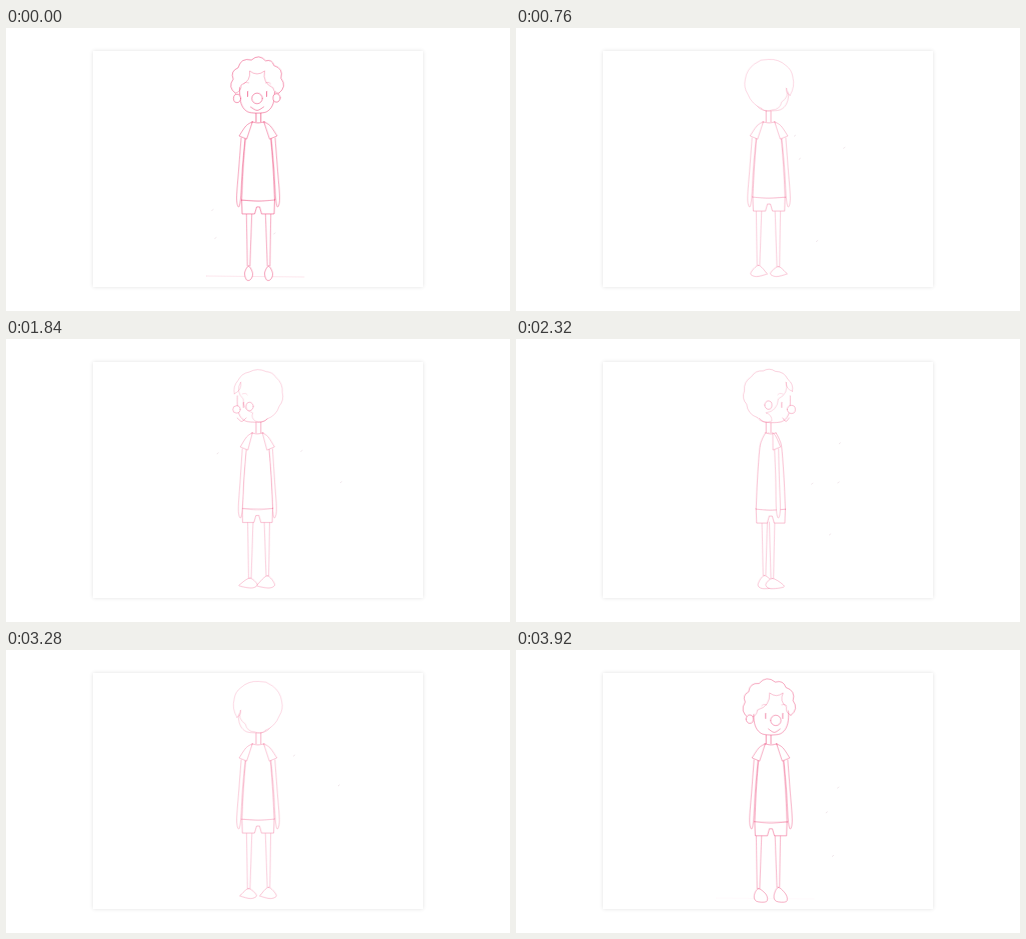
An HTML page with a canvas for the animation above (4040 ms loop, 504 by 283 pixels).

```html
<!DOCTYPE html>
<html lang="en">
<head>
<meta charset="utf-8">
<title>Turnaround sketch</title>
<style>
  html, body { margin: 0; width: 100%; height: 100%; overflow: hidden; background: #fff; }
  canvas { display: block; width: 504px; height: 283px; }
</style>
</head>
<body>
<canvas id="stage"></canvas>
<script>
const W = 504, H = 283, LOOP = 4040, VIEWS = 14, DRAWINGS = 42;
const HEAD = 251, MIRROR = 505;
const { PI, sin, cos, abs, sqrt, max, sign } = Math;
const canvas = document.getElementById('stage');
const ctx = canvas.getContext('2d');
const ratio = window.devicePixelRatio || 1;
canvas.width = W * ratio;
canvas.height = H * ratio;

function seeded(seed) {
  let n = seed * 7919 + 17;
  return () => (n = (n * 16807) % 2147483647) / 2147483647;
}

function polygon(pts) {
  const path = new Path2D();
  pts.forEach(p => path.lineTo(...p));
  return path;
}

// Smooth line through the points
function curve(pts, closed) {
  const path = new Path2D(), n = pts.length;
  const at = i => closed ? pts[(i + n) % n] : pts[max(0, Math.min(n - 1, i))];
  path.moveTo(...pts[0]);
  for (let i = 0; i < (closed ? n : n - 1); i++) {
    const [p, a, b, q] = [at(i - 1), at(i), at(i + 1), at(i + 2)];
    path.bezierCurveTo(a[0] + (b[0] - p[0]) / 6, a[1] + (b[1] - p[1]) / 6,
      b[0] - (q[0] - a[0]) / 6, b[1] - (q[1] - a[1]) / 6, ...b);
  }
  return path;
}

// A row of arcs, each bulging to the left of its direction of travel
function scallops(pts, depth) {
  const path = new Path2D();
  path.moveTo(...pts[0]);
  for (let i = 1; i < pts.length; i++) {
    const [x, y] = pts[i - 1], [u, v] = pts[i];
    path.quadraticCurveTo((x + u) / 2 + (v - y) * depth, (y + v) / 2 - (u - x) * depth, u, v);
  }
  return path;
}

function oval(x, y, rx, ry) {
  const path = new Path2D();
  path.ellipse(x, y, rx, ry, 0, 0, PI * 2);
  return path;
}

let ink = 1;
const pink = a => `rgba(235,62,115,${a})`;
const blank = path => { ctx.fillStyle = '#fff'; ctx.fill(path); };

function sketch(path, weight = 1) {
  ctx.lineWidth = .8;
  ctx.strokeStyle = pink(ink * weight);
  ctx.stroke(path);
  ctx.save();
  ctx.translate(.7, -.4);
  ctx.strokeStyle = pink(ink * weight * .3);
  ctx.stroke(path);
  ctx.restore();
}
function solid(path, weight) { blank(path); sketch(path, weight); }

// c, s: facing of head and feet. b: facing of the body, which hurries through profile.
function facing(view) {
  const turn = view * 2 * PI / VIEWS;
  const c = cos(turn), s = sin(turn);
  return { c, s, b: cos(turn - .4 * sin(2 * turn)), axis: 252 - 2.5 * s * (1 + c), hem: 170.5 + 1.5 * c };
}

function drawLeg(side, { c, s, b, hem }) {
  const hip = 252.5 + side * 9.5 * b, x = 252.5 + side * 10 * b;
  const top = hem + 13, y = 238 + side * s * 1.5, toe = sqrt(abs(s));
  const edge = w => [[hip + w * 2.7, top], [(hip + x) / 2 + w * 2, (top + y) / 2], [x + w * 1.3, y]];
  blank(polygon([...edge(-1), ...edge(1).reverse()]));
  for (const w of [-1, 1]) sketch(curve(edge(w)), .8);
  solid(curve([[x, y], [x - 4 - 6 * toe, 245], [x - 2 - 9 * toe, 249 + 3 * c],
    [x + 2, 250 + 1.5 * c], [x + 6 - 2 * c, 245.5]], true), .9);
}

function drawArm(side, { b, axis }) {
  const at = l => axis + side * l * b;
  const edge = w => [[at(15) + w * 2, 110], [at(17.5) + w * 1.8, 140], [at(19.5) + w * 2, 170]];
  solid(curve([...edge(-1), [at(19.5), 179], ...edge(1).reverse()]), .85);
}

function drawSleeve(side, { b, axis }) {
  const at = l => axis + side * l * b, out = 4 * (sign(side * b) || 1);
  const sleeve = curve([[at(6), 94], [at(11) + out * .3, 98], [at(15) + out, 108]]);
  sleeve.lineTo(at(15) - out * .8, 111);
  sleeve.closePath();
  solid(sleeve, .9);
}

function drawShorts({ s, axis, hem }) {
  const w = 16.5 * (1 - .12 * s * s);
  const half = k => [[w * k, hem], [(w - .5) * k, hem + 14], [3.5 * k, hem + 14], [1.5 * k, hem + 7]];
  const path = polygon([...half(-1), ...half(1).reverse()].map(([x, y]) => [axis + x, y]));
  path.closePath();
  solid(path);
}

function drawShirt({ s, axis, hem }) {
  const slim = 1 - .12 * s * s;
  const edge = k => [[6, 94], [10, 101], [12.5, 110], [15, 140], [16.5, hem]].map(([x, y]) => [axis + x * k * slim, y]);
  const left = edge(-1), right = edge(1);
  blank(polygon([...left, ...right.slice().reverse()]));
  sketch(curve(left));
  sketch(curve(right));
  sketch(curve([left[4], [axis, hem + 1.3], right[4]]), .8);
  sketch(curve([left[0], [axis, 95], right[0]]));
}

function drawHead(view, { c, s }) {
  const place = (l, f) => HEAD + l * c - f * s;
  const toward = (l, f) => l * s + f * c;
  const seen = c > -.8, middle = HEAD - 3 * s;

  const jaw = [[middle - 17.5, 57]];
  for (let i = 0; i <= 12; i++) {
    const a = PI * (1 - i / 12);
    jaw.push([middle + 17.5 * sign(cos(a)) * abs(cos(a)) ** .65, 64 + (20 + 1.2 * c) * abs(sin(a)) ** .85]);
  }
  if (c > -.95) solid(curve(jaw), seen ? 1 : .7);

  // Curls run over the skull from one temple to the other
  const random = seeded(view + 3), base = 47 - 22 * c;
  const from = PI - (base - 45 * s * (1 - c)) * PI / 180;
  const to = 2 * PI + (base + 10 * s) * PI / 180;
  const curls = [];
  for (let i = 0; i <= 7; i++) {
    const wobble = i % 7 ? (random() - .5) * .3 : 0;
    const a = from + (to - from) * (i + wobble) / 7;
    curls.push([HEAD + 1.5 * s + 24 * cos(a), 53 + (sin(a) < 0 ? 21.5 : 29) * sin(a)]);
  }
  const fringe = [curls[0]];
  for (const [l, f, y] of [[-16, 5, 57], [-7.5, 15, 43], [7.5, 15, 43], [16, 5, 60]]) {
    if (toward(l, f) > -4.5) fringe.push([place(l, f), y]);
  }
  if (c < .7 && c > -.95) fringe.push([place(17, -8), 74]);
  if (c < 0) fringe.push([HEAD - 2, 82]);
  fringe.push(curls[7]);

  const outline = scallops(curls, .35 + .15 * c);
  const mass = new Path2D(outline);
  fringe.slice().reverse().forEach(p => mass.lineTo(...p));
  blank(mass);
  sketch(outline, .8 + .2 * c);
  sketch(scallops(fringe, -.4), .65);
  if (!seen) return;

  if (s < .2) solid(oval(HEAD - 20, 70.5, 3.6, 4.2));
  solid(oval(place(19.5, -6), 70 - 4 * s * s, 3.6, 4.2));
  for (const l of [-9.5, 9.5]) {
    if (toward(l, 10) < -4) continue;
    const x = place(l, 10), k = sign(l);
    sketch(polygon([[x, 63.5], [x, 68.5]]), 1.3);
    sketch(curve([[x - k, 55], [x + k * 2, 54.5], [x + k * 4, 56]]), .5);
  }
  const nose = max(middle - 18.5, HEAD - s * (8 + 30 * s * s));
  solid(oval(nose, 70.5, 4.3 + c, 4.3 + c));
  const lips = HEAD + (nose - HEAD) * .75, smile = 3 + 3.5 * c * c;
  sketch(curve([[lips - smile, 79], [lips, 82.5], [lips + smile, 79]]));
}

function drawFigure(view) {
  const f = facing(view);
  const profile = abs(f.b) < .6;
  drawLeg(-1, f);
  drawLeg(1, f);
  drawArm(-1, f);
  if (profile) drawSleeve(-1, f);
  if (f.b > .6) drawArm(1, f);
  drawShorts(f);
  for (const w of [-2.4, 2.4]) sketch(polygon([[252.3 + w, 81], [252.3 + w, 94]]), 1.2);
  drawShirt(f);
  if (f.b <= .6) drawArm(1, f);
  if (!profile) drawSleeve(-1, f);
  drawSleeve(1, f);
  drawHead(view, f);
}

function drawPaper(view, front) {
  ctx.fillStyle = '#fff';
  ctx.fillRect(0, 0, W, H);
  ctx.save();
  ctx.shadowColor = 'rgba(0,0,0,.12)';
  ctx.shadowBlur = 4 * ratio;
  ctx.fillRect(87, 23, 330, 236);
  ctx.restore();

  // Faint scanner specks, and a ground line under the front view
  const random = seeded(view + 1);
  ctx.lineWidth = .7;
  ctx.strokeStyle = 'rgba(170,110,135,.22)';
  for (let i = 0; i < 4; i++) {
    const x = 200 + random() * 140, y = 100 + random() * 125;
    ctx.stroke(polygon([[x, y], [x + 1.5, y - 1]]));
  }
  ctx.strokeStyle = pink(.18 * front ** 4);
  ctx.stroke(polygon([[200, 248], [298, 249]]));
}

function drawView(view) {
  const front = max(0, cos(view * 2 * PI / VIEWS)) ** 4;
  drawPaper(view, front);
  ink = .32 + .23 * front;
  const flipped = view > VIEWS / 2;
  ctx.save();
  if (flipped) {
    ctx.translate(MIRROR, 0);
    ctx.scale(-1, 1);
  }
  drawFigure(flipped ? VIEWS - view : view);
  ctx.restore();
}

// Drawings run at 96 ms each, snapped to a 40 ms clock.
const startOf = n => Math.round(n * 2.4) * 40;
function drawingAt(ms) {
  let n = DRAWINGS - 1;
  while (startOf(n) > ms) n--;
  return n;
}

ctx.scale(ratio, ratio);
ctx.lineJoin = ctx.lineCap = 'round';
const begin = performance.now();
function tick() {
  drawView(drawingAt((performance.now() - begin) % LOOP) % VIEWS);
  requestAnimationFrame(tick);
}
tick();
</script>
</body>
</html>
```
